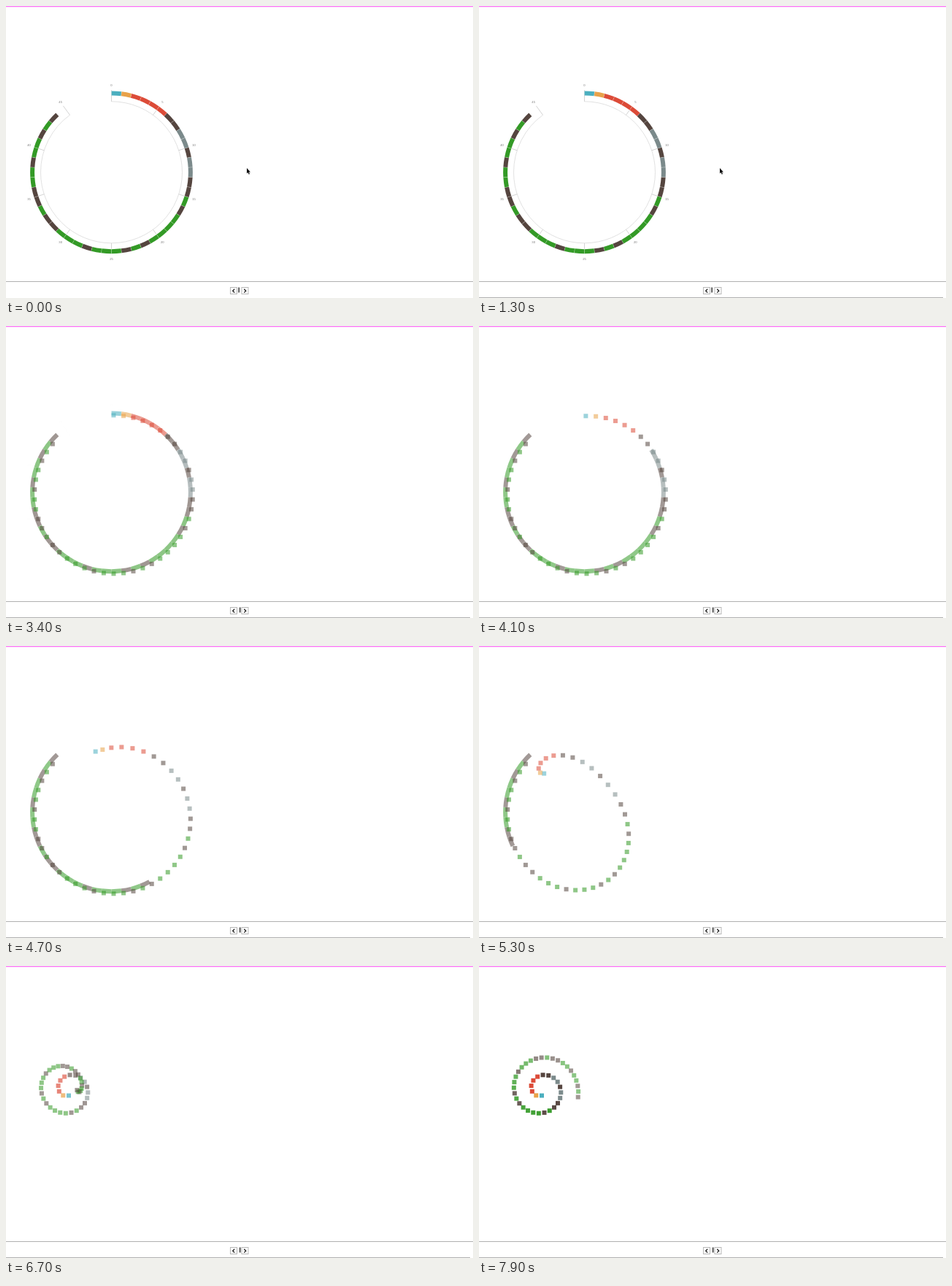
Write an HTML page with a canvas that moves like this. It is 640 px wide and 400 px high and loops after 8000 ms.

```html
<!DOCTYPE html>
<html lang="en">
<head>
<meta charset="utf-8">
<title>Ring to spiral</title>
<style>
html, body { margin: 0; width: 100%; height: 100%; overflow: hidden; background: #fff; }
canvas { display: block; }
</style>
</head>
<body>
<canvas id="stage" width="640" height="400"></canvas>
<script>
const ctx = document.getElementById('stage').getContext('2d');

const LOOP = 8000, DURATION = 2000;
const FADE_START = 1770, MOVE_START = 3770;
const CX = 144.5, CY = 227.8, STEP = Math.PI / 25;
const SIZE = 6, DIM = 0.55;

const COLORS = {
  t: '#4bafbf', o: '#e8a24a', r: '#dc4b38',
  b: '#55453f', s: '#7b8a8b', g: '#339a26'
};
const KINDS = 'torrrrbbssbssbbgbggggbgbgggbgggbbgbbggbggbgb';
const STAGGER = DURATION / KINDS.length;

// Angles run clockwise from the top.
const polar = (angle, r) => [CX + r * Math.sin(angle), CY - r * Math.cos(angle)];

// Evenly spaced places along an Archimedean spiral.
const spiralRadius = a => 2 + 12 * a / Math.PI;
let turn = Math.PI / 2;
const items = [...KINDS].map((kind, i) => {
  const r = spiralRadius(turn);
  const [x, y] = polar(i * STEP, 108.5);
  const item = {
    color: COLORS[kind],
    from: [x + SIZE / 2, y + SIZE / 2],
    to: [86 + r * Math.cos(turn), 169.5 + r * Math.sin(turn)],
    start: MOVE_START + i * STAGGER
  };
  turn += 7.66 / spiralRadius(turn + 3.8 / r);
  return item;
});

const mix = (a, b, k) => a + (b - a) * k;

function progress(t, start) {
  const u = Math.min(1, Math.max(0, (t - start) / DURATION));
  return u < 0.5 ? 4 * u ** 3 : 1 - 4 * (1 - u) ** 3;
}

function line(points, color, width = 1) {
  ctx.beginPath();
  points.forEach(p => ctx.lineTo(...p));
  ctx.strokeStyle = color;
  ctx.lineWidth = width;
  ctx.stroke();
}

function drawAxis() {
  ctx.strokeStyle = '#dadada';
  ctx.lineWidth = 0.8;
  ctx.beginPath();
  ctx.arc(CX, CY, 97, -Math.PI / 2, 45 * STEP - Math.PI / 2);
  ctx.stroke();
  ctx.font = '4.2px Arial, "Liberation Sans", sans-serif';
  ctx.textAlign = 'center';
  ctx.textBaseline = 'middle';
  ctx.fillStyle = '#777';
  for (let n = 0; n <= 45; n += 5) {
    const a = n * STEP;
    line([polar(a, 97), polar(a, n % 45 ? 105 : 112.5)], '#c8c8c8', 0.8);
    ctx.fillText(n, ...polar(a, 118.8));
  }
}

function drawSegment(i, color) {
  const a = i * STEP - Math.PI / 2;
  ctx.beginPath();
  ctx.arc(CX, CY, 111.4, a, a + STEP);
  ctx.arc(CX, CY, 105.4, a + STEP, a, true);
  ctx.closePath();
  ctx.fillStyle = color;
  ctx.fill();
  line([polar(i * STEP, 105.4), polar(i * STEP, 111.4)], 'rgba(255,255,255,0.5)', 0.5);
}

function drawButton(x, dir) {
  ctx.strokeStyle = '#b8b8b8';
  ctx.lineWidth = 1;
  ctx.strokeRect(x - 4.5, 385.5, 9, 9);
  line([[x - dir * 1.2, 387.8], [x + dir * 1.3, 390.2], [x - dir * 1.2, 392.6]], '#111', 1.2);
}

function drawPointer() {
  const tip = [[0, 0], [0, 7.5], [1.6, 6], [2.8, 8.7], [4, 8.1], [2.9, 5.6], [5, 5.4]];
  ctx.beginPath();
  tip.forEach(([x, y]) => ctx.lineTo(330 + x, 222 + y));
  ctx.closePath();
  ctx.fillStyle = '#111';
  ctx.fill();
}

function drawFrame(t) {
  ctx.globalAlpha = 1;
  ctx.fillStyle = '#fff';
  ctx.fillRect(0, 0, 640, 400);
  ctx.fillStyle = '#fb76f6';
  ctx.fillRect(0, 0, 640, 1.3);
  ctx.fillStyle = '#b0b0b0';
  ctx.fillRect(0, 377, 640, 1);
  const edgeHidden = t < 900 || (t > 5450 && t < 6350);
  if (!edgeHidden) ctx.fillRect(0, 399, 636, 1);

  drawButton(312, -1);
  drawButton(327.5, 1);
  const waiting = t < FADE_START;
  const caret = waiting ? 318.4 : 320;
  ctx.fillStyle = '#222';
  ctx.fillRect(caret, 385.5, 1.4, 7);
  ctx.fillStyle = '#bbb';
  ctx.fillRect(caret + 1.4, 386, 0.8, 6);

  const fade = progress(t, FADE_START);
  ctx.globalAlpha = 1 - fade;
  if (fade < 1) drawAxis();

  ctx.globalAlpha = mix(1, DIM, fade);
  items.forEach((item, i) => {
    if (t < item.start) drawSegment(i, item.color);
  });

  for (const { color, from, to, start } of items) {
    const k = progress(t, start);
    const x = mix(from[0], to[0], k), y = mix(from[1], to[1], k);
    ctx.globalAlpha = mix(DIM * fade, 1, progress(t, start + DURATION));
    ctx.fillStyle = color;
    ctx.fillRect(x - SIZE / 2, y - SIZE / 2, SIZE, SIZE);
  }

  ctx.globalAlpha = 1;
  if (waiting) drawPointer();
}

const begin = performance.now();
function tick() {
  drawFrame((performance.now() - begin) % LOOP);
  requestAnimationFrame(tick);
}
tick();
</script>
</body>
</html>
```
